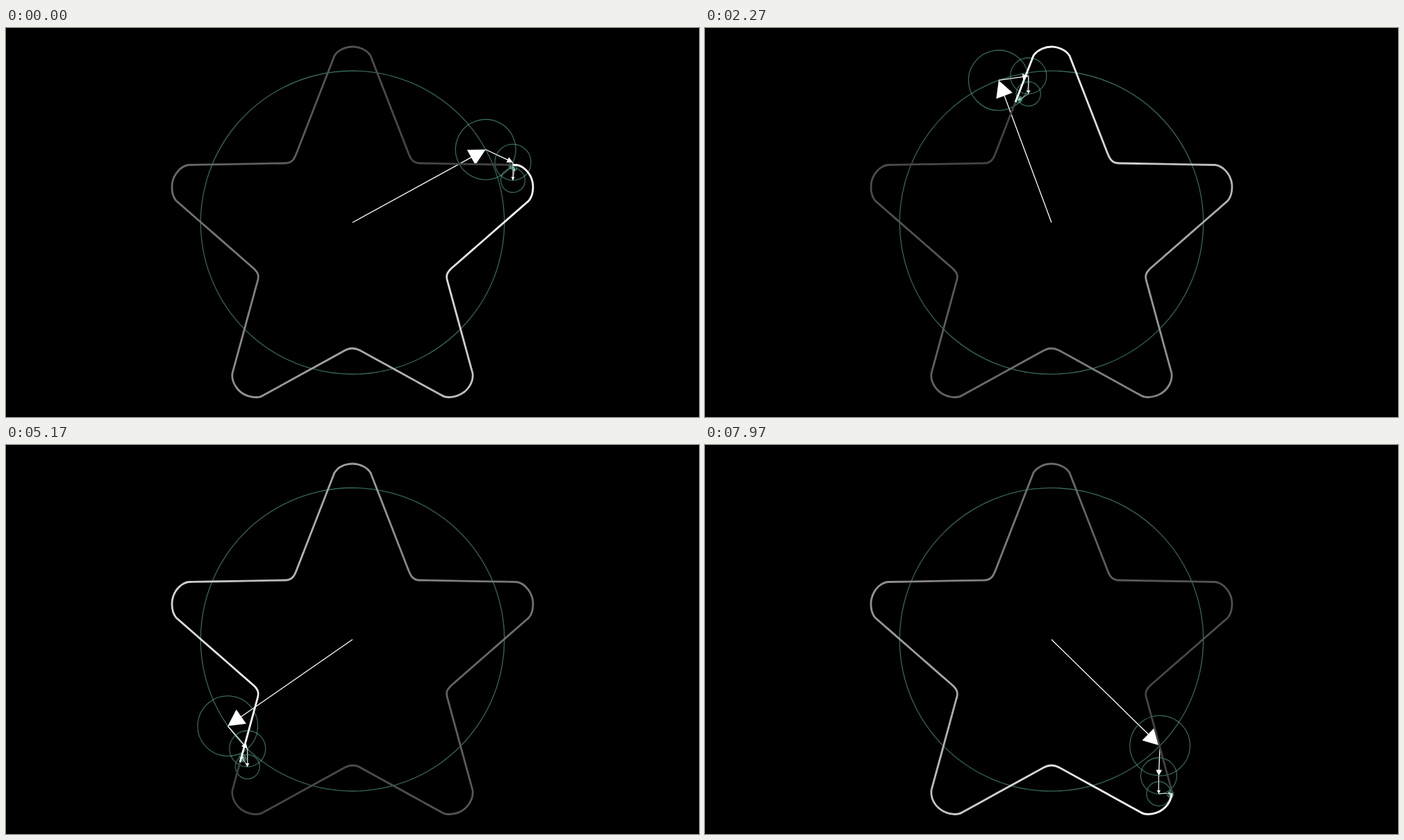
Write an HTML page without scripts that moves like this. It is 998x561 px and loops after 8000 ms.

```html
<!DOCTYPE html>
<html lang="en">
<head>
<meta charset="utf-8">
<title>Epicycle star</title>
<style>
@property --u { syntax: "<number>"; inherits: true; initial-value: 0; }
@property --s { syntax: "<number>"; inherits: true; initial-value: 0; }

html, body { margin: 0; width: 100%; height: 100%; overflow: hidden; background: #000; }
svg {
  display: block; width: 100vw; height: 100vh;
  animation: turn 8s steps(240) -4ms infinite, travel 8s -4ms infinite;
}

/* --u: turns of the main vector, counted from the top of the star */
@keyframes turn { from { --u: -.1701; } to { --u: .6299; } }

/* --s: distance of the pen along the star, 30 steps a second */
@keyframes travel {
  0% { --s: -337.7; animation-timing-function: steps(21); }
  8.75% { --s: -195.7; animation-timing-function: steps(15); }
  15% { --s: -86; animation-timing-function: steps(7); }
  17.9167% { --s: -28; animation-timing-function: steps(8); }
  21.25% { --s: 0; animation-timing-function: steps(8); }
  24.5833% { --s: 28; animation-timing-function: steps(9); }
  28.3333% { --s: 101; animation-timing-function: steps(13); }
  33.75% { --s: 195.7; animation-timing-function: steps(21); }
  42.5% { --s: 337.7; animation-timing-function: steps(9); }
  46.25% { --s: 376; animation-timing-function: steps(4); }
  47.9167% { --s: 393; animation-timing-function: steps(4); }
  49.5833% { --s: 409; animation-timing-function: steps(6); }
  52.0833% { --s: 455; animation-timing-function: steps(16); }
  58.75% { --s: 566; animation-timing-function: steps(14); }
  64.5833% { --s: 670; animation-timing-function: steps(8); }
  67.9167% { --s: 717; animation-timing-function: steps(8); }
  71.25% { --s: 744; animation-timing-function: steps(8); }
  74.5833% { --s: 772; animation-timing-function: steps(5); }
  76.6667% { --s: 810; animation-timing-function: steps(17); }
  83.75% { --s: 923; animation-timing-function: steps(17); }
  90.8333% { --s: 1036; animation-timing-function: steps(5); }
  92.9167% { --s: 1074; animation-timing-function: steps(8); }
  96.25% { --s: 1102; animation-timing-function: steps(9); }
  100% { --s: 1132; }
}

/* each vector sits on the previous tip (--p) and turns relative to it (--d) */
.chain g {
  --a: 0deg;
  transform: translate(var(--p), 0px) rotate(calc(var(--u) * var(--d) * -360deg + var(--a)));
}
.chain circle { fill: none; stroke: #5fb598; stroke-opacity: .57; stroke-width: 1.3; }
.chain path { fill: #fff; }

/* the trail: 50 dashes behind the pen, each darker than the one before */
.trail use {
  --b: calc(var(--i) / 50);
  fill: none;
  stroke: hsl(0 0% calc(100% * (1 - 1.3 * var(--b) + .55 * var(--b) * var(--b))));
  stroke-width: 2.8;
  stroke-dasharray: 37.42px 1808.58px;
  stroke-dashoffset: calc(((var(--i) + 1) * 36.92 - var(--s)) * 1px);
}
</style>
</head>
<body>
<svg viewBox="0 0 998 561">
  <defs>
    <path id="star" pathLength="1846" d="M499 27C489 27 478 32 473 40L419 179C416 187 413 195 402 195L263 197.5C251 199 239 213 239 229C239 238 241 244 245 249L357 347C363 353 365 357 362 366L326 498C324 513 337 532 360 532.5C364 532.5 367 532 370 530L488 465Q499 459 510 465L628 530C631 532 634 532.5 638 532.5C661 532 674 513 672 498L636 366C633 357 635 353 641 347L753 249C757 244 759 238 759 229C759 213 747 199 735 197.5L596 195C585 195 582 187 579 179L525 40C520 32 509 27 499 27Z"/>
  </defs>

  <g class="chain" transform="translate(499 280.5) rotate(-90)">
    <g style="--p:0px;--d:1">
      <circle r="218.7"/><path d="M0-.65H195V-12.5L218.7 0 195 12.5V.65H0z"/>
      <g style="--p:218.7px;--d:-5">
        <circle r="43.4"/><path d="M0-.65H35V-4.3L43.4 0 35 4.3V.65H0z"/>
        <g style="--p:43.4px;--d:4;--a:180deg">
          <circle r="26"/><path d="M0-.55H21V-2.6L26 0 21 2.6V.55H0z"/>
          <g style="--p:26px;--d:6;--a:180deg">
            <circle r="17.5"/><path d="M0-.4H14V-1.8L17.5 0 14 1.8V.4H0z"/>
            <g style="--p:17.5px;--d:-7">
              <circle r="3.2"/><path d="M0-.3H2.4V-.6L3.2 0 2.4 .6V.3H0z"/>
              <g style="--p:3.2px;--d:-6">
                <circle r="3"/><path d="M0-.3H2.2V-.6L3 0 2.2 .6V.3H0z"/>
                <g style="--p:3px;--d:-2;--a:180deg">
                  <circle r="2.6"/><path d="M0-.3H2V-.5L2.6 0 2 .5V.3H0z"/>
                  <g style="--p:2.6px;--d:13;--a:180deg">
                    <circle r="2"/><path d="M0-.3H1.5V-.5L2 0 1.5 .5V.3H0z"/>
                  </g>
                </g>
              </g>
            </g>
          </g>
        </g>
      </g>
    </g>
  </g>

  <g class="trail">
    <use href="#star" style="--i:49"/><use href="#star" style="--i:48"/>
    <use href="#star" style="--i:47"/><use href="#star" style="--i:46"/>
    <use href="#star" style="--i:45"/><use href="#star" style="--i:44"/>
    <use href="#star" style="--i:43"/><use href="#star" style="--i:42"/>
    <use href="#star" style="--i:41"/><use href="#star" style="--i:40"/>
    <use href="#star" style="--i:39"/><use href="#star" style="--i:38"/>
    <use href="#star" style="--i:37"/><use href="#star" style="--i:36"/>
    <use href="#star" style="--i:35"/><use href="#star" style="--i:34"/>
    <use href="#star" style="--i:33"/><use href="#star" style="--i:32"/>
    <use href="#star" style="--i:31"/><use href="#star" style="--i:30"/>
    <use href="#star" style="--i:29"/><use href="#star" style="--i:28"/>
    <use href="#star" style="--i:27"/><use href="#star" style="--i:26"/>
    <use href="#star" style="--i:25"/><use href="#star" style="--i:24"/>
    <use href="#star" style="--i:23"/><use href="#star" style="--i:22"/>
    <use href="#star" style="--i:21"/><use href="#star" style="--i:20"/>
    <use href="#star" style="--i:19"/><use href="#star" style="--i:18"/>
    <use href="#star" style="--i:17"/><use href="#star" style="--i:16"/>
    <use href="#star" style="--i:15"/><use href="#star" style="--i:14"/>
    <use href="#star" style="--i:13"/><use href="#star" style="--i:12"/>
    <use href="#star" style="--i:11"/><use href="#star" style="--i:10"/>
    <use href="#star" style="--i:9"/><use href="#star" style="--i:8"/>
    <use href="#star" style="--i:7"/><use href="#star" style="--i:6"/>
    <use href="#star" style="--i:5"/><use href="#star" style="--i:4"/>
    <use href="#star" style="--i:3"/><use href="#star" style="--i:2"/>
    <use href="#star" style="--i:1"/><use href="#star" style="--i:0"/>
  </g>
</svg>
</body>
</html>
```
